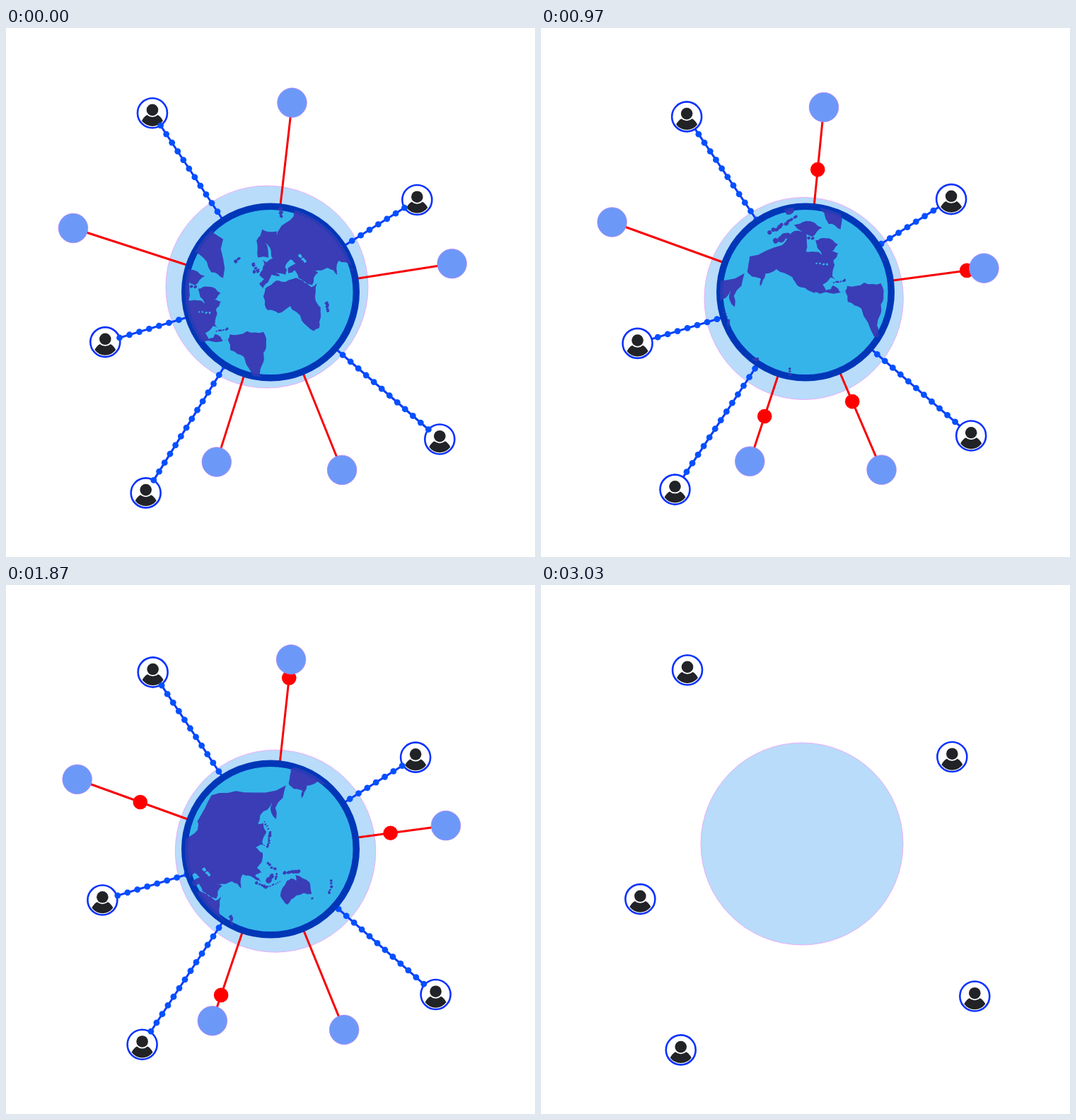
Animation of 748x748 px, one loop 3060 ms. Source, as an HTML page with a canvas:

```html
<!DOCTYPE html>
<html lang="en">
<head>
<meta charset="utf-8">
<title>Connected globe</title>
<style>
  html, body { margin: 0; width: 100%; height: 100%; overflow: hidden; background: #fff; }
  canvas { display: block; width: 748px; height: 748px; }
</style>
</head>
<body>
<canvas id="stage" width="748" height="748"></canvas>
<script>
const ctx = document.getElementById("stage").getContext("2d");
const LOOP = 3060, CYCLE = 3030, TAU = Math.PI * 2;
const CX = 374, CY = 373.5;
const SKY = "#35b4ea", LAND = "#3a3db6", RIM = "#0037b7";

let seed = 7;
function random() {
  seed = (seed * 16807) % 2147483647;
  return seed / 2147483647;
}

// ---- World map: Mercator, flat, tilted, sliding along its own x axis ----
const MAP = 418, DEG = MAP / 360, TILT = -30.5 * Math.PI / 180;
const SLIDE = MAP / 3000, EQUATOR = 36.8;
const land = new Path2D(), water = new Path2D();

function project(lon, lat) {
  return [lon * DEG, -Math.asinh(Math.tan(lat * Math.PI / 180)) * MAP / TAU];
}

// Split every edge and push the middle sideways for a ragged shore
function roughen(points) {
  return points.flatMap(([x, y], i) => {
    const [u, v] = points[(i + 1) % points.length];
    const push = (random() - 0.5) * 0.24;
    return [[x, y], [(x + u) / 2 + (v - y) * push, (y + v) / 2 - (u - x) * push]];
  });
}

function coast(text) {
  const corners = text.split(" ").map(pair => project(...pair.split(",").map(Number)));
  roughen(roughen(corners)).forEach(([x, y], i) => land[i ? "lineTo" : "moveTo"](x, y));
  land.closePath();
}

// A row of uneven blobs between two places
function chain(from, to, count, size, path = land) {
  const [x, y] = project(...from), [u, v] = project(...to);
  for (let i = 0; i < count; i++) {
    const p = count > 1 ? i / (count - 1) : 0.5;
    const bx = x + (u - x) * p + (random() - 0.5) * size;
    const by = y + (v - y) * p + (random() - 0.5) * size;
    const rx = size * (0.7 + random() * 0.5), ry = size * (0.5 + random() * 0.5);
    path.moveTo(bx + rx, by);
    path.ellipse(bx, by, rx, ry, 0, 0, TAU);
  }
}

// Africa
coast("-17,21 -17,14 -8,4.5 9,4.5 9,-1 13.5,-11 12,-17 18,-34 26,-34 35,-24 40,-15 39,-5 51,11.5 43,11 33,29 20,31 10,37 -6,36");
chain([45.5, -24], [49, -14], 5, 2.4);
// Europe and Asia
coast("-9,37 -9,43 -1.5,44 -4.5,48.5 8,54 9,57 11,54.5 20,54.5 23,59.5 22,65 16,56.5 5,60 14,68 27,71 41,67 35,65 44,67 68,69 73,72 104,77 140,72.5 188,66 163,58 157,51 156,57 163,62 143,59 135,54.7 141,53 139,46 128,40 129,35 125,39 118,39 122,31 115,22.5 107,20 109,12 100,13 103,2 98,9 94,16 88,21.5 80,14 77.5,8 72,21 57,25.5 48,30 59,22 45,12.8 35,28 36,36.5 27,37 30,41.5 41,41.5 38,47 28,44 28,41 23,37 19,41 13,45 17,39 9,44 0,39.5");
// The Americas
coast("-168,66 -156,71.3 -115,68.5 -94,71 -82,68 -94,59 -82,55 -79,51.5 -77,62 -65,60 -56,52 -66,50 -61,46 -70,43 -76,36 -81,31 -80,25.5 -84,30 -97,27.5 -97,20 -91,18.5 -87,21 -83,15 -83,9.5 -77,8 -95,15.5 -106,21 -112,30 -110,23.5 -117,33 -124,40 -124,48 -136,59 -150,60 -164,54.5 -158,58.5 -165,62");
coast("-77,8 -72,12 -52,5 -35,-6 -41,-22 -48,-27 -57,-37 -65,-43 -69,-55 -75,-50 -71,-20 -81,-5");
coast("-73,78 -60,82 -30,83.5 -20,75 -44,60 -53,66 -55,75");
// Australia
coast("114,-23 130,-12 136,-12 140,-17.5 142.5,-11 153,-27 148,-38 131,-31.5 116,-35");
// Northern islands
coast("-62,66 -78,64.5 -90,73 -75,72");
chain([-118, 71], [-104, 71], 4, 5);
chain([-120, 75], [-84, 75], 9, 3.6);
chain([-88, 77], [-70, 82], 5, 8);
chain([-92, 66], [-78, 64], 4, 2.4);
chain([54, 71.5], [66, 76.5], 5, 3);
chain([-21, 65], [-17, 65], 2, 3);
chain([-3, 51.5], [-4, 58], 5, 2.6);
chain([-8, 53], [-8, 54], 2, 2);
// Tropical islands
chain([-84, 22.5], [-70, 19], 6, 1.7);
chain([97, 4], [105, -5], 5, 2.3);
chain([107, -7], [122, -8.5], 7, 1.2);
chain([111, 0], [117, 3], 4, 4);
chain([120, -4], [123, 1], 4, 1.8);
chain([133, -2], [148, -8.5], 6, 3);
chain([121, 17], [125, 7], 5, 2);
// Pacific islands
chain([131, 33], [143, 44], 8, 2.2);
chain([143, 47], [143, 54], 4, 1.5);
chain([146.5, -42], [146.5, -42], 1, 2.2);
chain([168, -45.5], [177, -37], 5, 2);
// Inland water
chain([50, 46], [52, 38], 5, 2.2, water);
chain([-90, 47.5], [-80, 43], 4, 1.6, water);

// ---- Parts that sway: rest + cosine * a + sine * b ----
const sway = (x, y, a, b, more) => ({ x, y, a, b, ...more });
const halo = sway(374, 374, [-5, -8], [-5, 5.5]);
const users = [
  sway(207, 122.7, [0, -2.5], [-1, 1.8]),
  sway(580.2, 243, [1.1, 0], [0.4, -1]),
  sway(137.9, 445.1, [2.4, -1], [-0.4, 0.4]),
  sway(609.9, 579.3, [3.4, 2.2], [-0.3, -2]),
  sway(193.7, 653.4, [4, 4], [-2.8, 1])
];
// turn: the moment the red dot reaches the globe
const discs = [
  sway(402.8, 107.2, [1.7, -1.6], [-2.3, 4.5], { turn: 1225 }),
  sway(98.5, 277.8, [-3.5, 5.2], [0.6, -1.2], { turn: 2190 }),
  sway(626.4, 337.4, [4.2, -4.2], [2, 0.5], { turn: 1610 }),
  sway(295, 614.3, [2.8, -0.7], [1.6, -2.1], { turn: 1320 }),
  sway(477.9, 626.3, [-2.8, -1.3], [2.7, -2.4], { turn: 770 })
];

function place({ x, y, a, b }, t) {
  const c = Math.cos(TAU * t / CYCLE), s = Math.sin(TAU * t / CYCLE);
  return [x + a[0] * c + b[0] * s, y + a[1] * c + b[1] * s];
}

// Point at distance r from the globe's centre, towards (x, y)
function toward(x, y, r) {
  const k = r / Math.hypot(x - CX, y - CY);
  return [CX + (x - CX) * k, CY + (y - CY) * k];
}

function circle(x, y, r, fill, stroke, width, rx = r) {
  ctx.beginPath();
  ctx.ellipse(x, y, rx, r, 0, 0, TAU);
  if (fill) { ctx.fillStyle = fill; ctx.fill(); }
  if (stroke) { ctx.strokeStyle = stroke; ctx.lineWidth = width; ctx.stroke(); }
}

function spoke(x, y, color) {
  ctx.beginPath();
  ctx.moveTo(CX, CY);
  ctx.lineTo(x, y);
  ctx.strokeStyle = color;
  ctx.lineWidth = 3;
  ctx.stroke();
}

function drawHalo(t) {
  const squeeze = 2.8 * Math.sin(TAU * t / CYCLE) ** 2;
  circle(...place(halo, t), 143, "#b8dcfa", "#f29cf8", 0.8, 143 - squeeze);
}

const body = new Path2D("M-15 11 Q-12 5 -7.5 2.8 A11 11 0 0 0 7.5 2.8 Q12 5 15 11 A18.5 18.5 0 0 1 -15 11Z");

function drawUser(x, y) {
  circle(x, y, 21, "#fff", "#0a32ff", 2.6);
  ctx.save();
  ctx.translate(x, y);
  circle(0, -4.3, 8.3, "#222326");
  ctx.fill(body);
  ctx.restore();
}

// Beads run from the icon's edge in to the globe
function drawBeads(x, y, t) {
  const gap = 14.6, edge = 20.5, dist = Math.hypot(CX - x, CY - y);
  let d = (6.5 + 0.0241 * t) % gap;
  while (d < edge) d += gap;
  for (; d < dist - 110; d += gap)
    circle(...toward(x, y, dist - d), 4.4, "#0450ff");
}

// A red dot goes in and back out; a faint one blinks where it met the globe
function drawPulse(x, y, age) {
  const leg = 800, near = 133;
  const blink = (age - 40) / 150;
  if (blink > 0 && blink < 1) {
    ctx.globalAlpha = 0.5 * Math.sin(Math.PI * blink);
    circle(...toward(x, y, 125), 11.5, "#f00");
    ctx.globalAlpha = 1;
  }
  const p = Math.abs(age) / leg;
  if (p > 1) return;
  const far = Math.hypot(x - CX, y - CY);
  circle(...toward(x, y, near + (far - near) * p), 10.3, "#f00");
}

function drawGlobe(t) {
  circle(CX, CY, 121.3, SKY, RIM, 9.4);
  ctx.save();
  ctx.beginPath();
  ctx.arc(CX, CY, 121, 0, TAU);
  ctx.clip();
  ctx.translate(CX, CY - 0.5);
  ctx.rotate(TILT);
  ctx.translate(3.2 + SLIDE * t - 2 * MAP, EQUATOR);
  for (let i = 0; i < 4; i++) {
    ctx.fillStyle = LAND;
    ctx.fill(land);
    ctx.fillStyle = SKY;
    ctx.fill(water);
    ctx.translate(MAP, 0);
  }
  ctx.restore();
  ctx.globalAlpha = 0.3;
  circle(CX, CY, 119, null, RIM, 4.6);
  ctx.globalAlpha = 1;
}

function draw(now) {
  const time = now % LOOP, t = time % CYCLE;
  const bare = time >= CYCLE;
  const people = users.map(u => place(u, t));
  const spots = discs.map(d => place(d, t));

  ctx.fillStyle = "#fff";
  ctx.fillRect(0, 0, 748, 748);
  drawHalo(t);
  if (!bare) {
    spots.forEach(([x, y]) => spoke(x, y, "#f80006"));
    people.forEach(([x, y]) => spoke(x, y, "#0a3cfa"));
  }
  people.forEach(([x, y]) => drawUser(x, y));
  if (bare) return;

  people.forEach(([x, y]) => drawBeads(x, y, t));
  drawGlobe(t);
  discs.forEach((d, i) => drawPulse(...spots[i], t - d.turn));
  spots.forEach(([x, y]) => circle(x, y, 20.8, "#6c99f8", "#b57cf6", 0.7));
}

const origin = performance.now();
function tick() {
  draw(performance.now() - origin);
  requestAnimationFrame(tick);
}
tick();
</script>
</body>
</html>
```
